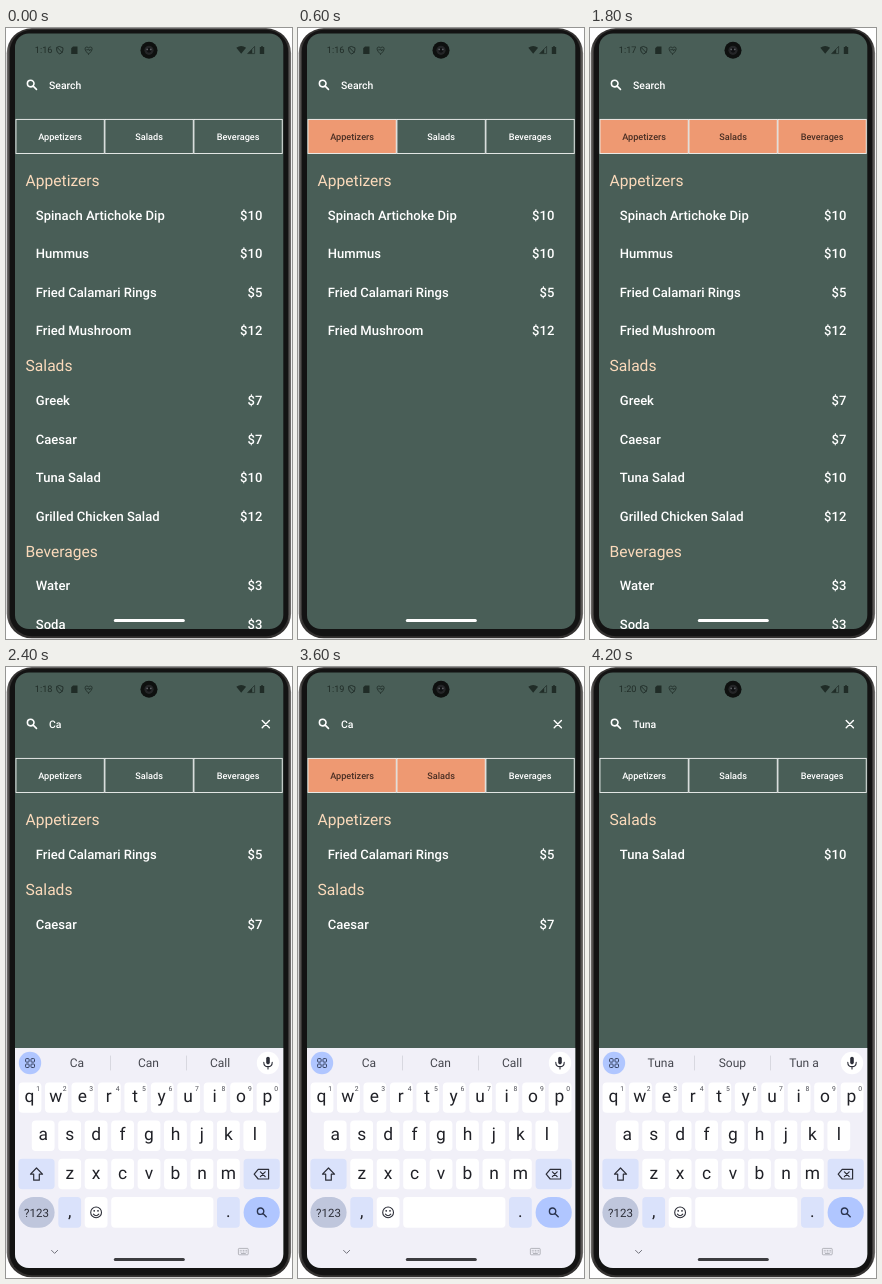
Animation, 286 px wide and 611 px high, one loop 4.8 s. Source, as an HTML page:

```html
<!DOCTYPE html>
<html lang="en">
<head>
<meta charset="utf-8">
<title>Menu filter</title>
<style>
html, body { margin: 0; width: 100%; height: 100%; overflow: hidden; background: #fff; }
svg { display: block; width: 100%; height: 100%; font-family: Roboto, sans-serif; text-rendering: geometricPrecision; }
.step { visibility: hidden; animation: show 4.8s step-end infinite; }
@keyframes show {
  0% { visibility: visible; }
  12.5%, 100% { visibility: hidden; }
}
.line { fill: none; stroke: currentColor; stroke-linecap: round; stroke-linejoin: round; }
.mid { text-anchor: middle; }
.end { text-anchor: end; }
.head { font-size: 15.6px; fill: #fbdabb; }
.item { font-size: 13.04px; font-weight: 500; fill: #fff; }
.query { font-size: 10.43px; font-weight: 500; fill: #fff; }
.tab { font-size: 9.13px; font-weight: 500; }
.clock { font-size: 9.13px; fill: #202c27; }
.key { font-size: 17.4px; fill: #202127; }
.num { font-size: 6.8px; fill: #4b4c54; }
.hint { font-size: 12px; fill: #45464e; }
</style>
</head>
<body>
<svg viewBox="0 0 286 611">
  <defs>
    <clipPath id="screen"><rect x="9" y="5.5" width="268.3" height="595.5" rx="14"/></clipPath>
    <linearGradient id="rim">
      <stop offset="0" stop-color="#777573"/>
      <stop offset=".012" stop-color="#343231"/>
      <stop offset=".988" stop-color="#343231"/>
      <stop offset="1" stop-color="#777573"/>
    </linearGradient>
  </defs>
  <rect x=".7" y=".3" width="284.4" height="610" rx="25" fill="url(#rim)"/>
  <rect x="3.8" y="1.8" width="278.4" height="606.4" rx="22" fill="#131313"/>
  <g clip-path="url(#screen)">
    <rect x="9" y="5" width="269" height="597" fill="#495e57"/>
    <g id="steps"></g>
  </g>
  <circle cx="143" cy="22.3" r="8.5" fill="#0e100f"/>
  <circle cx="143" cy="22.3" r="4.6" fill="#242527"/>
  <circle cx="143" cy="22.3" r="2.4" fill="#101113"/>
  <circle cx="141.2" cy="21.4" r=".9" fill="#5c5f62"/>
  <circle cx="144.8" cy="21.4" r=".9" fill="#5c5f62"/>
</svg>
<script>
const STEP = 600;
const MENU = [
  ['Appetizers', ['Spinach Artichoke Dip', 10], ['Hummus', 10], ['Fried Calamari Rings', 5], ['Fried Mushroom', 12]],
  ['Salads', ['Greek', 7], ['Caesar', 7], ['Tuna Salad', 10], ['Grilled Chicken Salad', 12]],
  ['Beverages', ['Water', 3], ['Soda', 3]]
];
const CA = ['Ca', 'Can', 'Call'];
const STATES = [
  { time: '1:16', picked: [] },
  { time: '1:16', picked: [0] },
  { time: '1:17', picked: [0, 1] },
  { time: '1:17', picked: [0, 1, 2] },
  { time: '1:18', picked: [], query: 'Ca', hints: CA },
  { time: '1:19', picked: [0], query: 'Ca', hints: CA },
  { time: '1:19', picked: [0, 1], query: 'Ca', hints: CA },
  { time: '1:20', picked: [], query: 'Tuna', hints: ['Tuna', 'Soup', 'Tun a'] }
];

const text = (x, y, cls, str, more = '') => `<text x="${x}" y="${y}" class="${cls}" ${more}>${str}</text>`;
const rect = (x, y, w, h, fill, r = 0) => `<rect x="${x}" y="${y}" width="${w}" height="${h}" rx="${r}" fill="${fill}"/>`;
const disc = (x, y, r, fill) => `<circle cx="${x}" cy="${y}" r="${r}" fill="${fill}"/>`;
const line = (d, color, w = 1) => `<path class="line" d="${d}" color="${color}" stroke-width="${w}"/>`;
const shape = (d, fill) => `<path d="${d}" fill="${fill}"/>`;
const lens = (x, y, r, color, w) =>
  line(`M${x - r} ${y}a${r} ${r} 0 1 1 ${2 * r} 0a${r} ${r} 0 1 1 ${-2 * r} 0M${x + r * .75} ${y + r * .75}l${r} ${r}`, color, w);

function statusBar(time) {
  const ink = '#202c27';
  return text(28.8, 25.4, 'clock', time) +
    line('M53.8 18.6l3.1 1.2v2.3q0 2.5-3.1 3.9q-3.1-1.4-3.1-3.9v-2.3zM51.5 19.8l4.7 4.8', ink, .9) +
    shape('M67 18.4h4.5v7.6h-6.3v-5.8z', ink) +
    line('M82.6 26q-3.6-2.5-3.6-5q0-2 1.8-2q1.2 0 1.8 1q.6-1 1.8-1q1.8 0 1.8 2q0 2.5-3.6 5zM80.6 21.8h1.2l.8-1l.8 2l.5-1h1', ink, .8) +
    shape('M230.3 19.8q4.9-3.6 9.8 0l-4.9 6z', ink) +
    line('M248.6 18.8v6.8h-6.6z', ink, .7) +
    shape('M246.2 21v4.6h-4.2z', ink) +
    shape('M255 18.2h2v.9h1.2v7h-4.4v-7h1.2z', ink);
}

function searchBar(query) {
  const clear = query ? line('M256.2 53.6l7.2 7.2m0-7.2l-7.2 7.2', '#fff', 1.4) : '';
  return lens(24.7, 55.6, 3.3, '#fff', 1.6) + text(43, 61, 'query', query || 'Search') + clear;
}

function tabs(picked) {
  const w = 89, inset = .35;
  return MENU.map(([name], i) => {
    const on = picked.includes(i), x = 9.6 + i * w;
    return `<rect x="${x + inset}" y="91.4" width="${w - 2 * inset}" height="34.1" fill="${on ? '#ee9972' : 'none'}" stroke="#f2f4f3" stroke-width=".9"/>` +
      text(x + w / 2, 111.8, 'tab mid', name, `fill="${on ? '#4a2f24' : '#fff'}"`);
  }).join('');
}

function list({ picked, query = '' }) {
  let y = 158.2, out = '';
  MENU.forEach(([title, ...dishes], i) => {
    if (picked.length && !picked.includes(i)) return;
    const found = dishes.filter(([name]) => name.toLowerCase().includes(query.toLowerCase()));
    if (!found.length) return;
    out += text(19.6, y, 'head', title);
    found.forEach(([name, price], n) => {
      const base = y + 33.8 + n * 38.45;
      out += text(29.8, base, 'item', name) + text(256.3, base, 'item end', '$' + price);
    });
    y += 31.4 + found.length * 38.45;
  });
  return out;
}

function keyRow(letters, x, top, numbered) {
  return [...letters].map((ch, i) => {
    const cx = x + i * 26.45;
    return rect(cx - 11.4, top, 22.8, 30.4, '#fff', 4) +
      text(cx - (numbered ? .6 : 0), top + 19.8, 'key mid', ch) +
      (numbered ? text(cx + 8.2, top + 8.2, 'num mid', (i + 1) % 10) : '');
  }).join('');
}

function keyboard(hints) {
  const ink = '#2c2e38', pale = '#dae2fb', blue = '#b0c6ff';
  let out = rect(9, 381, 269, 221, '#f1f0f8') + disc(24, 396, 11.2, blue) + disc(262, 396, 11.2, '#fff');
  for (const x of [19.6, 25])
    for (const y of [391.6, 397])
      out += `<rect x="${x}" y="${y}" width="3.5" height="3.5" rx=".8" fill="none" stroke="#35415f" stroke-width="1"/>`;
  out += rect(260.2, 389.8, 3.6, 7.6, ink, 1.8) + line('M257.8 395.4q0 4.2 4.2 4.2t4.2-4.2M262 399.8v2.2', ink, 1.1);
  hints.forEach((word, i) => out += text(70.8 + i * 71.6, 400.2, 'hint mid', word));
  out += line('M104.5 389v14M180.5 389v14', '#d2d2da', .8);

  out += keyRow('qwertyuiop', 24, 415.4, true) + keyRow('asdfghjkl', 37.2, 453.6) + keyRow('zxcvbnm', 63.7, 491.8);

  out += rect(12.4, 491.8, 36.2, 30.4, pale, 4) +
    line('M30.5 501l6 6.2h-3.2v6h-5.6v-6h-3.2z', ink, 1.2) +
    rect(237.6, 491.8, 36.2, 30.4, pale, 4) +
    line('M252.2 502.4h10.4v9.6h-10.4l-4-4.8zM254.4 504.8l4.8 4.8m0-4.8l-4.8 4.8', ink, 1.2);

  out += rect(12.4, 530, 36.2, 30.8, '#bfc6dc', 15.4) + text(30.5, 549.8, 'mid', '?123', `font-size="11.5" fill="${ink}"`) +
    rect(52.3, 530, 22.8, 30.8, pale, 4) + text(63.7, 549.6, 'key mid', ',') +
    rect(78.7, 530, 22.8, 30.8, '#fff', 4) +
    line('M84.7 545.4a5.4 5.4 0 1 1 10.8 0a5.4 5.4 0 1 1-10.8 0M87.4 547.2q2.7 3 5.4 0', ink, 1.1) +
    disc(88.2, 543.8, .9, ink) + disc(92, 543.8, .9, ink) +
    rect(105.2, 530, 102.2, 30.8, '#fff', 4) +
    rect(211, 530, 22.8, 30.8, pale, 4) + text(222.4, 549.6, 'key mid', '.') +
    rect(237.6, 530, 36.2, 30.8, blue, 15.4) + lens(254.6, 544.2, 3.2, '#2b3550', 1.4);

  out += line('M45.6 583.4l3 3l3-3', '#70717a', 1) +
    `<rect x="232.4" y="581.4" width="9.8" height="6.4" rx=".8" fill="none" stroke="#9b9ca4" stroke-width=".7"/>` +
    `<path d="M233.8 583.4h7.4M233.8 585h7.4" stroke="#9b9ca4" stroke-width=".8" stroke-dasharray=".9 .7"/>` +
    line('M235.4 586.5h4', '#9b9ca4', .7);
  return out;
}

document.getElementById('steps').innerHTML = STATES.map((s, i) =>
  `<g class="step" style="animation-delay:${(i - STATES.length) * STEP}ms">` +
  statusBar(s.time) + searchBar(s.query) + tabs(s.picked) + list(s) +
  (s.hints ? keyboard(s.hints) : '') +
  rect(107.8, 591, 71, 3, s.hints ? '#3c3c40' : '#fff', 1.5) + '</g>'
).join('');
</script>
</body>
</html>
```
